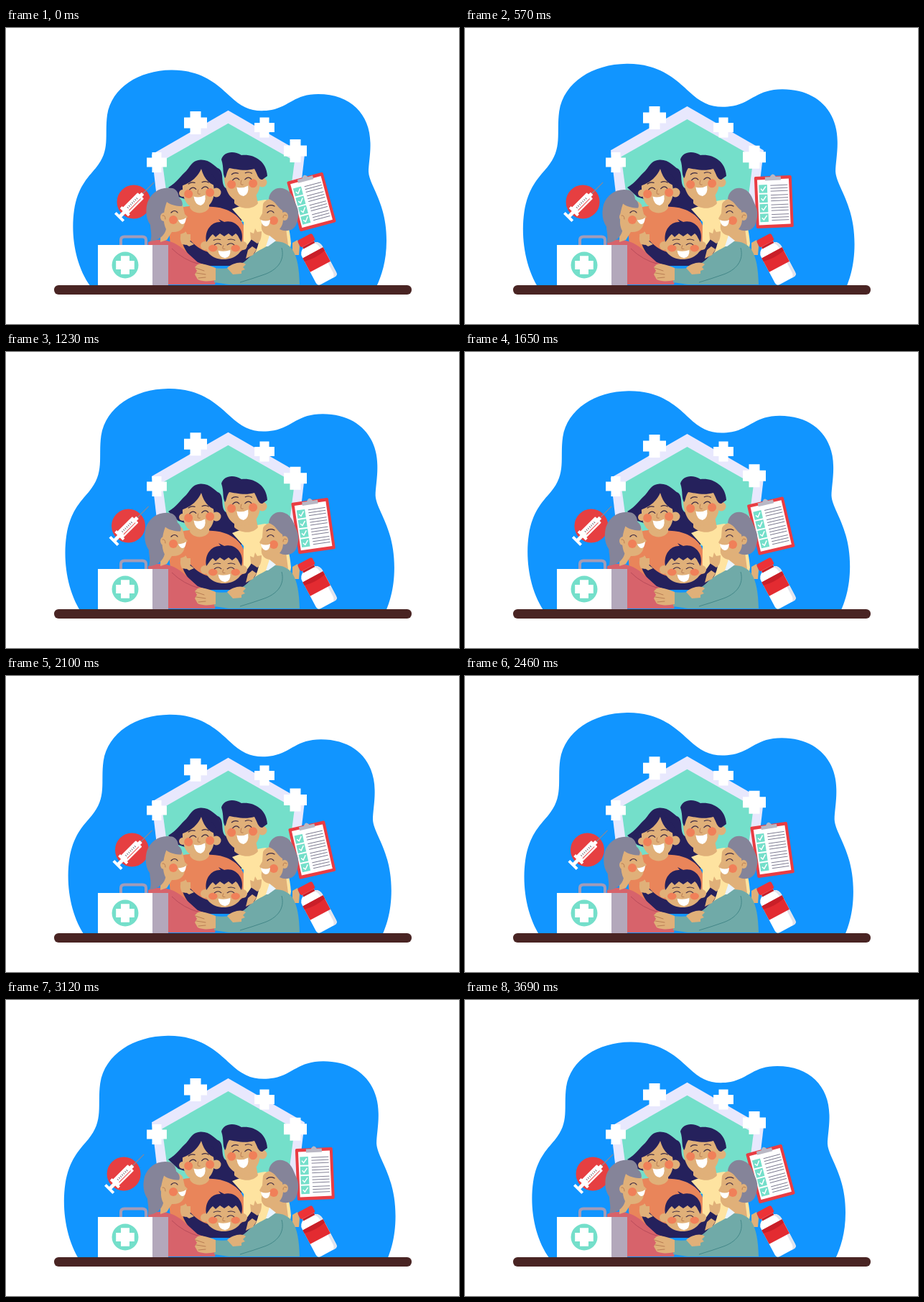
Recreate the animation shown at these times as an HTML page. Size 631 px wide and 412 px high, loop 3720 ms.

```html
<!DOCTYPE html>
<html lang="en">
<head>
<meta charset="utf-8">
<title>Family health</title>
<style>
html, body { margin: 0; width: 100%; height: 100%; overflow: hidden; background: #fff; }
svg { display: block; width: 631px; height: 412px; }
.skin { fill: #e0b079; }
.navy { fill: #25215c; }
.grey { fill: #858499; }
.cheek { fill: #f08059; }
.ink { fill: none; stroke: #3b2842; stroke-width: 1.2; stroke-linecap: round; }
.fold { fill: none; stroke: #b97e54; stroke-width: 1; stroke-linecap: round; }
</style>
</head>
<body>
<svg viewBox="0 0 631 412">
  <defs>
    <path id="plus" d="M-7.500-16H7.500V-7.500H16V7.500H7.500V16H-7.500V7.500H-16V-7.500H-7.500Z"/>
    <g id="face">
      <circle class="cheek" cx="-15" cy="2" r="6"/>
      <circle class="cheek" cx="15" cy="2" r="6"/>
      <path class="ink" d="M-13-4Q-8-9-4-4M4-4Q9-9 13-4M-14-12Q-10-15-5-13M5-13Q10-15 14-12"/>
      <path class="fold" d="M-1-3Q-4 4 1 3"/>
      <path d="M-8 6Q0 9 8 5Q9 17 1 19Q-7 18-8 6Z" fill="#fff"/>
    </g>
  </defs>

  <path id="blob" fill="#1195ff" d="M118 360C96 330 90 287 95 253C100 222 113 209 125 195C146 170 137 150 141 121C147 83 185 59 230 58.5C272 58 294 78 312 95C330 112 345 118 370 114C395 109 402 92 435 92C480 92 507 120 507.5 160C508 175 505 190 505 200C506 220 530 242 530 296C530 325 523 345 516 360Z"/>

  <g id="house">
    <path fill="#e8e8fd" d="M309.500 114.800L416 176L405 270H214L203 176Z"/>
    <path fill="#74dfca" d="M309.500 132.800L402 185L391 270H229L217.500 185Z"/>
  </g>
  <g fill="#fff">
    <use href="#plus" id="crossA"/>
    <use href="#plus" transform="translate(360 138.500) scale(.87)"/>
    <use href="#plus" id="crossB"/>
    <use href="#plus" transform="translate(210 187) scale(.87)"/>
  </g>

  <g id="syringe">
    <circle cx="178" cy="242" r="23.500" fill="#e63f41"/>
    <g transform="translate(175 246) rotate(-45)">
      <path d="M17 0H44" stroke="#8a8797" stroke-width="1.200"/>
      <path d="M-24 0H-12" stroke="#fff" stroke-width="5"/>
      <path d="M-24-8V8M-13-8V8" stroke="#fff" stroke-width="4"/>
      <rect x="-12" y="-6" width="30" height="12" rx="1" fill="#fff"/>
      <rect x="17" y="-2.500" width="5" height="5" fill="#fff"/>
      <path d="M-8 3H15" stroke="#e63f41" stroke-width="1"/>
      <path d="M-7-1H14" stroke="#77717f" stroke-width="2.500" stroke-dasharray="1 2"/>
    </g>
  </g>

  <g id="board">
    <rect x="-26" y="-36" width="52" height="72" rx="2" fill="#e93d43"/>
    <rect x="-22" y="-31.500" width="44" height="63" fill="#fff"/>
    <path d="M-11-30V-35H-4Q0-42 4-35H11V-30Z" fill="#b9b7c4"/>
    <g id="items"></g>
  </g>

  <!-- mother -->
  <path class="navy" d="M226 222C238 215 243 206 251 199C257 192 260 184 271 183.500C285 183 290 193 297 196C304 202 299 215 305 222C318 230 332 245 331 264C326 272 318 273 312 270L286 250L240 235Z"/>
  <path fill="#e9855a" d="M226 262C236 248 250 249 260 247L288 249C310 250 326 262 331 275L338 320H230Z"/>
  <path class="skin" d="M258 240H283V250C278 260 261 260 256 250Z"/>
  <path class="skin" d="M246 218C248 205 260 194 270 195C284 200 290 212 290 230C288 246 279 252 269 252C254 251 245 241 246 218Z"/>
  <circle class="skin" cx="293" cy="229" r="6.500"/>
  <circle class="skin" cx="246" cy="230" r="5"/>
  <path class="navy" d="M272 196C265 212 250 220 234 222C246 210 254 194 266 189Q285 193 297 221C285 219 276 211 272 196Z"/>
  <use href="#face" transform="translate(269 228) rotate(-4)"/>

  <!-- father -->
  <path fill="#fee3a0" d="M315 252C328 247 350 240 361 239C380 244 394 260 397 300L390 340H330L331 270Z"/>
  <path class="skin" d="M318 230H348L351 244C343 254 326 252 318 244Z"/>
  <path class="skin" d="M304 205C306 190 323 186 342 191C354 196 356 209 353 223C350 235 340 243 328 242C311 241 304 224 304 205Z"/>
  <circle class="skin" cx="357" cy="215" r="6.500"/>
  <path class="navy" d="M300 183C303 172 317 170 328 177C345 175 363 185 364 206L357 211C351 211 350 203 346 196C333 200 318 196 311 195C307 200 307 208 305 209C301 202 304 195 300 183Z"/>
  <use href="#face" transform="translate(329 215) rotate(-3)"/>

  <!-- boy -->
  <path class="navy" d="M246 300L254 292C262 303 272 309 282 312H325C333 308 339 299 343 292L352 298C349 315 338 326 327 331H275C260 325 250 312 246 300Z"/>
  <path class="skin" d="M245 301C241 293 243 286 247 288L250 283L252 287L257 287L257 296L251 302Z"/>
  <path class="skin" d="M341 294L340 284L345 286L347 279L350 284L356 283C356 291 355 297 350 300Z"/>
  <circle class="skin" cx="277" cy="303" r="6"/>
  <circle class="skin" cx="330" cy="303" r="6"/>
  <path class="skin" d="M278 296C283 276 324 276 329 296C332 312 319 322 303 322C288 322 275 312 278 296Z"/>
  <path class="navy" d="M279 298C276 281 287 269 299 270L296 266L304 270C319 266 333 280 328 298C325 294 324 289 320 286L315 290L310 286L304 290L298 286L292 291L288 287C283 291 282 295 279 298Z"/>
  <use href="#face" transform="translate(304 305) scale(1.050 .8)"/>

  <!-- grandmother -->
  <path fill="#d7636b" d="M198 298C214 291 233 296 246 307L267 326L296 337L291 357H198Z"/>
  <path class="skin" d="M216 250C222 236 239 237 246 246L249 259L253 263L249 267C250 278 243 285 231 284L224 295L215 298Z"/>
  <g id="hair"><path class="grey" d="M201 297C204 288 201 281 201 274C195 266 194 254 197 243C202 229 215 220 232 223C238 225 240 229 241 236C245 239 247 244 245 248C237 248 229 246 224 242C220 253 217 268 223 280C221 288 215 295 201 297Z"/></g>
  <ellipse class="skin" cx="220" cy="263" rx="5" ry="6"/>
  <path class="fold" d="M218 261Q222 260 222 266"/>
  <circle class="cheek" cx="233" cy="267" r="6"/>
  <path class="ink" d="M230 257Q235 252 239 257"/>
  <path d="M240 267Q246 268 251 264Q250 274 245 273Q241 271 240 267Z" fill="#fff"/>
  <path class="skin" d="M243 287L251 284L255 296L262 301L255 304L244 297Z"/>
  <path d="M231 307Q247 323 270 329" fill="none" stroke="#b94c5a" stroke-width="1"/>

  <!-- grandfather -->
  <path class="skin" d="M358 245C363 234 388 234 391 248L393 265L390 279L393 302L370 298L367 289C356 287 354 278 357 270L353 265L357 258Z"/>
  <path class="grey" d="M366 238C367 227 377 220 388 224C399 228 401 240 405 248C409 257 407 267 404 274C401 281 391 285 381 280C388 272 386 262 385 254C378 250 376 241 366 238Z"/>
  <ellipse class="skin" cx="388" cy="262" rx="5" ry="6"/>
  <path class="fold" d="M386 264Q386 258 391 261"/>
  <circle class="cheek" cx="373" cy="268" r="6"/>
  <path class="ink" d="M364 257Q369 252 373 257M363 249Q368 245 374 248"/>
  <path d="M355 267Q362 270 368 267Q367 277 361 276Q356 274 355 267Z" fill="#fff"/>
  <path class="skin" d="M399 299L406 295L409 304L408 316H399Z"/>
  <path fill="#70aaa8" d="M290 334C312 337 328 331 339 319C352 308 364 305 374 297C397 297 408 311 409 357H310L290 354Z"/>
  <path d="M362 304L367 289L376 296L365 304Z" fill="#e9f4ff"/>
  <path d="M384 306C389 324 377 337 360 343Q343 349 326 354" fill="none" stroke="#438788" stroke-width="1"/>
  <path class="skin" d="M292 334C282 330 272 327 267 329L263 333L266 338L263 343L267 350C276 354 284 352 292 351Z"/>
  <path class="fold" d="M264 334L276 338M265 341L278 343M268 348L278 347"/>
  <path class="skin" d="M308 334C316 327 328 324 334 329L330 333L333 336L328 338L328 342L316 343Z"/>
  <path class="skin" d="M334 321L337 309L343 304L349 308L344 316Z"/>

  <!-- first-aid kit -->
  <path d="M160 302V295Q160 290.500 165 290.500H190Q195 290.500 195 295V302" fill="none" stroke="#a39cb8" stroke-width="4"/>
  <rect x="128" y="302" width="76" height="56" fill="#fff"/>
  <rect x="204" y="302" width="22" height="56" fill="#b3a8bb"/>
  <circle cx="166" cy="330" r="18.500" fill="#74dfca"/>
  <use href="#plus" transform="translate(166 330) scale(.8)" fill="#fff"/>

  <!-- bottle -->
  <g transform="translate(435 327) rotate(-28)">
    <path d="M-9-32H9V-28Q16-25 16-18V23Q16 28 11 28H-11Q-16 28-16 23V-18Q-16-25-9-28Z" fill="#fff"/>
    <path d="M9-28Q16-25 16-18V23Q16 28 11 28H8Q12 26 12 21V-18Q12-25 6-28Z" fill="#e1e3ed"/>
    <rect x="-11.500" y="-41" width="23" height="11" rx="3" fill="#ed3237"/>
    <path d="M-9-30H9V-27H-9Z" fill="#c91f28"/>
    <rect x="-16" y="-16" width="32" height="22" fill="#e32b31"/>
    <path d="M-16-16H16V-11Q0-7-16-11Z" fill="#c91f28"/>
  </g>

  <rect x="67" y="358" width="498" height="13" rx="6.200" fill="#492423"/>
</svg>
<script>
const STEP = 30, COUNT = 124;
const $ = id => document.getElementById(id);
const place = (id, value) => $(id).setAttribute('transform', value);

// Each pair is a time in ms and an amount of travel.
const swell = [[0, 0], [450, .65], [570, .76], [845, 1], [990, .88], [1230, .66], [1590, .41], [1860, .25]];
const sway = [[0, 0], [280, .5], [570, .87], [770, 1], [900, .94], [1230, .47], [1590, .16], [1860, .03]];

function sample(keys, t) {
  const i = Math.max(1, keys.findIndex(k => k[0] >= t));
  const [a, from] = keys[i - 1], [b, to] = keys[i];
  return from + (to - from) * (t - a) / (b - a);
}

$('items').innerHTML = [-19, -5.5, 8, 21.5].map(y => `
  <rect x="-20" y="${y - 5.5}" width="11.500" height="11.500" fill="#74dfca"/>
  <path d="M-17.500 ${y}l2.500 3l4.500-6" fill="none" stroke="#fff" stroke-width="1.500"/>
  <path d="M-4 ${y - 4}H20M-4 ${y}H20M-4 ${y + 4}H20" stroke="#77758c" stroke-width=".9"/>`).join('');

function draw(now) {
  const n = Math.floor(now / STEP) % COUNT;
  const t = Math.min(n, COUNT - 1 - n) * STEP;
  const scale = 1 + .0755 * sample(swell, t);
  const k = sample(sway, t);
  place('blob', `translate(311.5 209.5) scale(${scale}) translate(-311.5 -209.5)`);
  place('house', `translate(0 ${-6.6 * k})`);
  place('crossA', `translate(264 ${132 - 8 * k})`);
  place('crossB', `translate(403 ${171 + 10 * k})`);
  place('syringe', `translate(${-16 * k} 0)`);
  place('board', `translate(${425.5 + 5.5 * k} 242) rotate(${-15 + 14.4 * k})`);
  place('hair', `translate(${-4.5 * k} ${3 * k})`);
}

let start;
function tick(now) {
  start ??= now;
  draw(now - start);
  requestAnimationFrame(tick);
}
draw(0);
requestAnimationFrame(tick);
</script>
</body>
</html>
```
